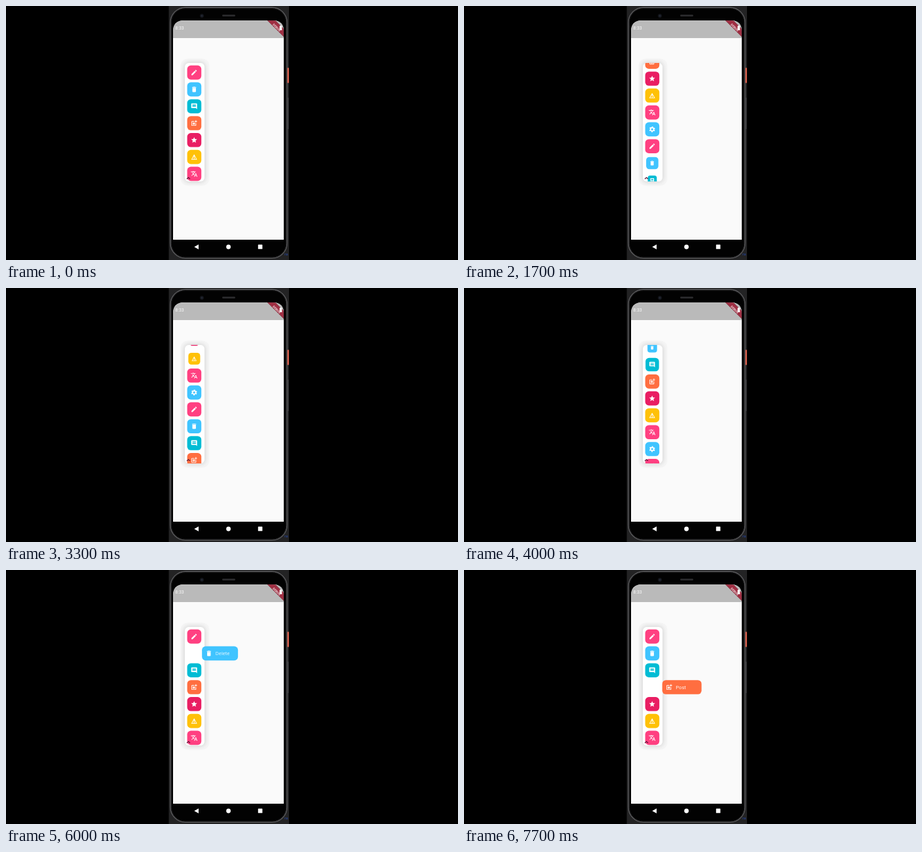
An HTML page that plays this animation: 690 px wide and 388 px high, repeating every 8 s.

```html
<!DOCTYPE html>
<html lang="en">
<head>
<meta charset="utf-8">
<title>Scrolling toolbar</title>
<style>
  html, body { margin: 0; width: 100%; height: 100%; overflow: hidden; background: #000; }
  svg { display: block; width: 100vw; height: 100vh; }
  text { font-family: Roboto, "Open Sans", sans-serif; fill: #fff; }
</style>
</head>
<body>
<svg viewBox="0 0 690 388">
  <defs>
    <clipPath id="screen"><path d="M255 357V39Q255 22 272 22H407Q424 22 424 39V357Z"/></clipPath>
    <clipPath id="view"><rect x="273" y="87" width="150" height="181" rx="5"/></clipPath>
    <filter id="soft" x="-50%" y="-20%" width="200%" height="140%"><feGaussianBlur stdDeviation="3.2"/></filter>
  </defs>

  <rect width="690" height="388"/>
  <rect x="248.5" width="183.5" height="388" fill="#232324"/>
  <rect x="251" y="2.2" width="178" height="383" rx="23" fill="#000" stroke="#5b5b5d" stroke-width="1.4"/>
  <rect x="252.5" y="3.8" width="175" height="380" rx="21" fill="#020202" stroke="#1c1c1d"/>
  <rect x="429.6" y="94.5" width="2.2" height="23" fill="#e9644f"/>
  <rect x="430" y="140" width="1.6" height="48" fill="#39393b"/>
  <rect x="330" y="13.3" width="20" height="2.8" rx="1.4" fill="#2b2b2d"/>
  <circle cx="299" cy="15" r="3" fill="#14161c"/>
  <circle cx="299" cy="15" r="1.2" fill="#252a38"/>
  <text x="425" y="381" font-size="5" style="fill:#2546a0">na</text>

  <g clip-path="url(#screen)">
    <rect x="255" y="22" width="169" height="335" fill="#fafafa"/>
    <rect x="255" y="22" width="169" height="27" fill="#bababa"/>
    <text x="258.3" y="35.8" font-size="7" fill-opacity=".9">8:33</text>
    <path d="M399 22H411L424 35V47Z" fill="#9f2f43" stroke="#8b4a55" stroke-width=".8"/>
    <text transform="translate(412 34) rotate(45)" text-anchor="middle" font-size="4.6" font-weight="700" fill-opacity=".85">DEBUG</text>
    <path d="M417.6 30.6h1v-.8h1.6v.8h1v6.3h-3.6z" fill="#fff"/>
  </g>
  <g fill="#fff">
    <path d="M287.3 368L294 364.2V371.8Z"/>
    <circle cx="339.6" cy="368" r="3.4"/>
    <rect x="384.8" y="364.6" width="6.6" height="6.6" rx=".5"/>
  </g>

  <rect x="266.5" y="80.5" width="44" height="194" rx="11" fill="#f5f5f5"/>
  <rect x="272" y="86" width="32" height="183" rx="7" fill="#000" fill-opacity=".14" filter="url(#soft)"/>
  <rect x="273" y="87" width="30" height="181" rx="6" fill="#fff"/>
  <g id="list" clip-path="url(#view)"></g>
  <path d="M276 264.3L278.4 262L281 264" fill="none" stroke="#5c1434" stroke-width="1.3"/>
</svg>
<script>
const LOOP = 8000, COUNT = 16;
const LEFT = 276.6, SIZE = 21.6, RADIUS = 5.6, FIRST = 101.6, PITCH = 25.8;
const POP = 400, SLIDE = 500;

const KINDS = [
  { color: '#ff4081', label: 'Edit', icon: 'M3 17.25V21h3.75L17.81 9.94l-3.75-3.75zM20.71 7.04c.39-.39.39-1.02 0-1.41l-2.34-2.34c-.39-.39-1.02-.39-1.41 0l-1.83 1.83 3.75 3.75z' },
  { color: '#40c4ff', label: 'Delete', icon: 'M6 19c0 1.1.9 2 2 2h8c1.1 0 2-.9 2-2V7H6zM19 4h-3.5l-1-1h-5l-1 1H5v2h14z' },
  { color: '#00bcd4', label: 'Comment', icon: 'M22 4c0-1.1-.9-2-2-2H4c-1.1 0-2 .9-2 2v12c0 1.1.9 2 2 2h14l4 4zM18 14H6v-2h12zM18 11H6V9h12zM18 8H6V6h12z' },
  { color: '#ff6e40', label: 'Post', icon: 'M17 19H5V7h7V5H5c-1.1 0-2 .9-2 2v12c0 1.1.9 2 2 2h12c1.1 0 2-.9 2-2v-7h-2zM19 2h-2v3h-3v2h3v3h2V7h3V5h-3zM7 9h8v2H7zM7 12h8v2H7zM7 15h8v2H7z' },
  { color: '#e91e63', label: 'Star', icon: 'M12 17.27L18.18 21l-1.64-7.03L22 9.24l-7.19-.61L12 2 9.19 8.63 2 9.24l5.46 4.73L5.82 21z' },
  { color: '#ffc107', label: 'Details', icon: 'M12 3L2 21h20zM13 8.92L18.6 19H13zM11 8.92V19H5.4z' },
  { color: '#ff4081', label: 'Translate', icon: 'M12.87 15.07l-2.54-2.54c1.74-1.94 2.98-4.17 3.71-6.53H17V4h-7V2H8v2H1v2h11.17C11.5 7.92 10.44 9.75 9 11.35 8.07 10.32 7.3 9.19 6.69 8h-2c.73 1.63 1.73 3.17 2.98 4.56l-5.09 5.02L4 19l5-5 3.11 3.11zM18.5 10h-2L12 22h2l1.12-3h4.75L21 22h2zM15.88 17l1.62-4.33L19.12 17z' },
  { color: '#40c4ff', label: 'Settings', gear: true }
];

// Scroll offset over time: one fling down, one back up
const SCROLL = [[900, 0], [1300, 40], [1700, 93.7], [2000, 123], [2400, 145.3], [2800, 156],
  [2980, 156], [3300, 122.7], [3700, 70], [4200, 20], [4700, 0]];

// Row index and the times its label opens and closes
const OPEN = { 1: [5700, 6500], 2: [6500, 7100], 3: [7100, Infinity] };

const clamp = x => Math.min(1, Math.max(0, x));
const ease = x => 1 - Math.pow(1 - clamp(x), 2.2);

const slopes = SCROLL.slice(1).map(([t, y], i) => (y - SCROLL[i][1]) / (t - SCROLL[i][0]));
const tangents = SCROLL.map((_, i) => {
  const a = slopes[i - 1] || 0, b = slopes[i] || 0;
  return a * b > 0 ? 2 * a * b / (a + b) : 0;
});

// Monotone cubic through the scroll points
function offsetAt(t) {
  const i = SCROLL.findIndex(p => p[0] > t) - 1;
  if (i < 0) return 0;
  const [t0, y0] = SCROLL[i], [t1, y1] = SCROLL[i + 1];
  const h = t1 - t0, u = (t - t0) / h, v = 1 - u;
  return v * v * (1 + 2 * u) * y0 + u * u * (3 - 2 * u) * y1
    + h * u * v * (v * tangents[i] - u * tangents[i + 1]);
}

const centerAt = (i, t) => FIRST + i * PITCH - offsetAt(t);
const isVisible = (i, t) => Math.abs(centerAt(i, t) - 177.5) < 101.3;

// Rows grow from half size after coming into view
function scaleAt(i, t) {
  for (let age = 0; age < POP; age += 10) {
    if (!isVisible(i, t - age)) return 0.5 + 0.5 * age / POP;
  }
  return 1;
}

function openAt(i, t) {
  if (!OPEN[i]) return 0;
  const [from, to] = OPEN[i];
  return ease((t - from) / SLIDE) - ease((t - to) / SLIDE);
}

function add(parent, tag, attrs) {
  const node = document.createElementNS('http://www.w3.org/2000/svg', tag);
  for (const key in attrs) node.setAttribute(key, attrs[key]);
  return parent.appendChild(node);
}

function drawIcon(parent, kind) {
  const g = add(parent, 'g', { transform: `translate(10.6 ${SIZE / 2}) scale(.45) translate(-12 -12)`, fill: '#fff' });
  if (!kind.gear) {
    add(g, 'path', { d: kind.icon, 'fill-rule': 'evenodd' });
    return;
  }
  const ring = { cx: 12, cy: 12, fill: 'none', stroke: '#fff' };
  const step = 2 * Math.PI * 8.2 / 6;
  add(g, 'circle', { ...ring, r: 5.4, 'stroke-width': 3.8 });
  add(g, 'circle', { ...ring, r: 8.2, 'stroke-width': 3.4, 'stroke-dasharray': step / 2, 'stroke-dashoffset': -step / 4 });
}

const list = document.getElementById('list');
const rows = Array.from({ length: COUNT }, (_, i) => {
  const kind = KINDS[i % KINDS.length];
  const g = add(list, 'g', {});
  const clip = add(add(g, 'clipPath', { id: 'row' + i }), 'rect', { height: SIZE, rx: RADIUS });
  const box = add(g, 'rect', { height: SIZE, rx: RADIUS, fill: kind.color });
  drawIcon(g, kind);
  const label = add(add(g, 'g', { 'clip-path': `url(#row${i})` }), 'text', { x: 20.6, y: 13.6, 'font-size': 7.7 });
  label.textContent = kind.label;
  return { g, clip, box, label };
});

function render(t) {
  rows.forEach(({ g, clip, box, label }, i) => {
    const shown = isVisible(i, t);
    g.style.display = shown ? '' : 'none';
    if (!shown) return;
    const open = openAt(i, t), width = SIZE + 38.4 * open;
    const x = LEFT + 26 * open + SIZE / 2, half = -SIZE / 2;
    g.setAttribute('transform', `translate(${x} ${centerAt(i, t)}) scale(${scaleAt(i, t)}) translate(${half} ${half})`);
    box.setAttribute('width', width);
    clip.setAttribute('width', width);
    label.setAttribute('opacity', 0.92 * open);
  });
}

const start = performance.now();
function tick() {
  render((performance.now() - start) % LOOP);
  requestAnimationFrame(tick);
}
tick();
</script>
</body>
</html>
```
